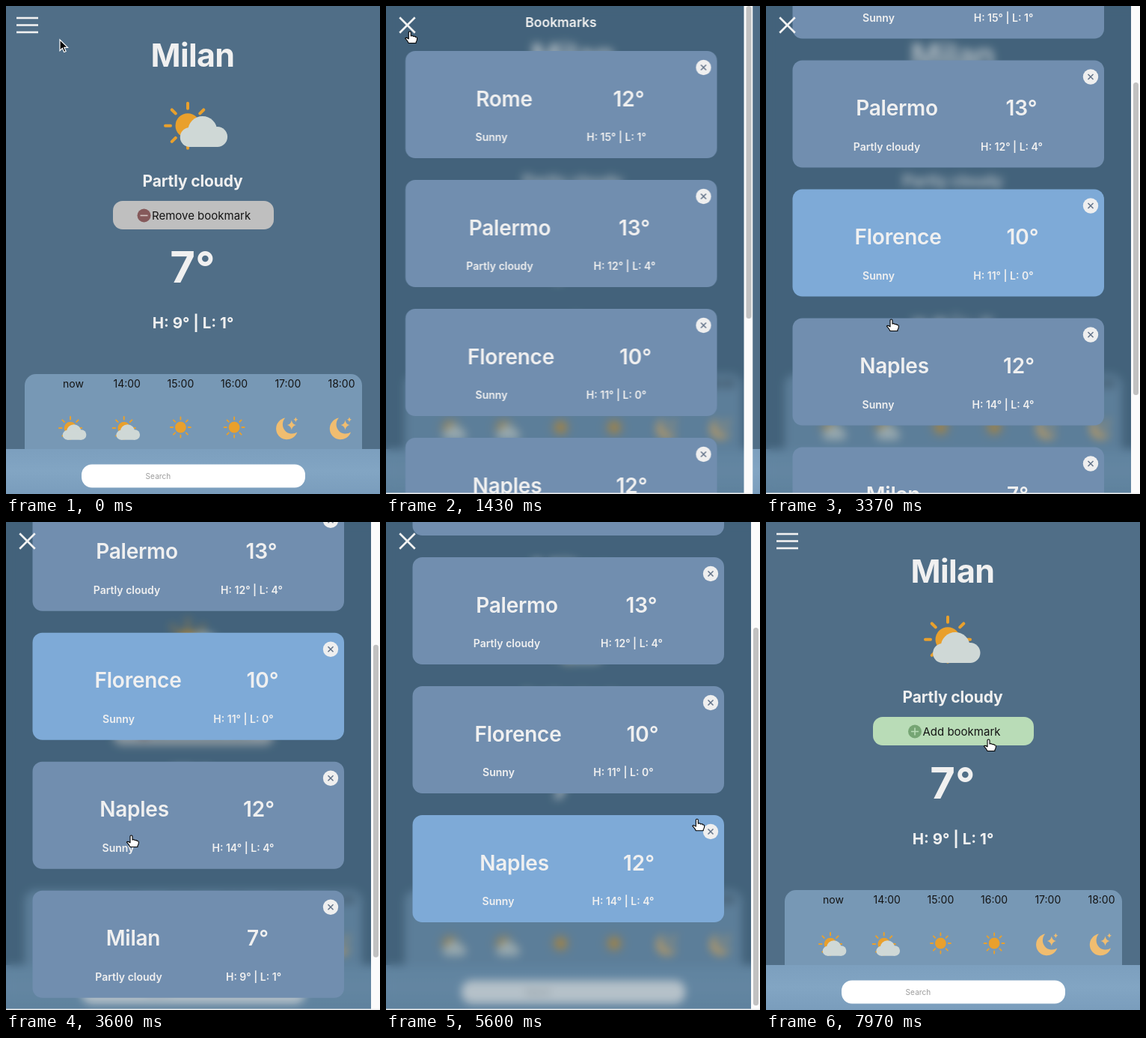
Animation, 500 px wide and 651 px high, one loop 8000 ms. Source, as an HTML page:

```html
<!DOCTYPE html>
<html lang="en">
<head>
<meta charset="utf-8">
<title>Weather bookmarks</title>
<style>
  html, body { margin: 0; width: 100%; height: 100%; overflow: hidden; background: #506e87; }
  body { position: relative; font-family: Inter, sans-serif; }
  svg { position: absolute; left: 0; top: 0; width: 500px; height: 651px; }
  text { text-anchor: middle; fill: #f0f0f0; }
  .bold { font-weight: 700; }
  .semi { font-weight: 600; }
  .dark { fill: #141414; }
  #panel {
    position: absolute; left: 0; top: 0; width: 500px; height: 651px; overflow: hidden;
    background: rgba(44, 79, 100, .35);
    -webkit-backdrop-filter: blur(6px); backdrop-filter: blur(6px);
  }
</style>
</head>
<body>
<svg id="main" viewBox="0 0 500 651">
  <defs>
    <g id="sun">
      <circle r="16.5" fill="#e9a02c"/>
      <path id="rays" stroke="#e9a02c" stroke-width="4" stroke-linecap="round"/>
    </g>
    <g id="cloud" fill="#cfd8d6">
      <circle cx="235.5" cy="175" r="13"/>
      <circle cx="252.5" cy="166.5" r="19.5"/>
      <circle cx="272.3" cy="174.5" r="13.5"/>
      <rect x="235" y="170" width="38" height="18"/>
    </g>
    <g id="partly">
      <use href="#sun" x="243" y="156.5"/>
      <use href="#cloud"/>
    </g>
    <g id="moon" fill="#f0bd70">
      <path d="M-3-13A14.5 14.5 0 1 0 13 6A12.5 12.5 0 0 1-3-13Z"/>
      <path d="M5.5-10q1 5.500 6 6.500q-5 1-6 6.500q-1-5.500-6-6.500q5-1 6-6.500ZM11-14q.5 2.800 3 3.300q-2.500.5-3 3.300q-.5-2.800-3-3.300q2.500-.5 3-3.300Z"/>
    </g>
    <linearGradient id="bar" x2="0" y2="1">
      <stop stop-color="#7c9fbe"/><stop offset=".5" stop-color="#82a5c3"/><stop offset="1" stop-color="#7a9dbc"/>
    </linearGradient>
  </defs>
  <rect width="500" height="651" fill="#506e87"/>
  <text class="bold" x="249.500" y="80.500" font-size="43" letter-spacing="-.6">Milan</text>
  <use id="bigSun" href="#sun"/>
  <use id="bigCloud" href="#cloud"/>
  <text class="bold" x="249.500" y="241" font-size="21" letter-spacing="-.15">Partly cloudy</text>
  <rect id="button" x="143" y="260" width="215" height="38" rx="13"/>
  <circle id="badge" cy="279.500" r="9"/>
  <path id="sign" fill="none" stroke-width="1.600"/>
  <text id="label" class="dark" y="285" font-size="15" style="text-anchor:start"></text>
  <text class="bold" x="249.500" y="369" font-size="58">7°</text>
  <text class="bold" x="250" y="430" font-size="20.500">H: 9° | L: 1°</text>
  <rect x="25" y="491" width="451" height="160" rx="15" fill="#7798b5"/>
  <g id="hours"></g>
  <rect y="591" width="500" height="60" fill="url(#bar)"/>
  <rect x="101" y="611.500" width="299" height="31" rx="14" fill="#fff"/>
  <text x="203.500" y="631" font-size="10" letter-spacing=".1" style="fill:#9c9c9c">Search</text>
</svg>

<div id="panel">
  <svg viewBox="0 0 500 651">
    <g id="list">
      <text class="semi" x="243.500" y="27.500" font-size="17.500">Bookmarks</text>
    </g>
    <rect x="488" width="12" height="651" fill="#fbfbfb"/>
    <rect id="thumb" x="491" width="7" rx="3.500" fill="#c1c1c1"/>
    <rect y="649.500" width="500" height="1.500" fill="#f0f0f0"/>
  </svg>
</div>

<svg viewBox="0 0 500 651">
  <g id="burger" stroke="#f2f2f2" stroke-width="2.600">
    <path d="M-14.500 0h29"/><path d="M-14.500 0h29"/><path d="M-14.500 0h29"/>
  </g>
  <path id="arrow" fill="#000" stroke="#fff" stroke-width="1.200"
        d="M0 0V14.500l3.400-3.200 2.300 5.200 2.400-1-2.300-5.100h4.700Z"/>
  <path id="hand" fill="#fff" stroke="#000" stroke-width="1.100" stroke-linejoin="round"
        d="M-2 9V1.500a1.500 1.500 0 0 1 3 0V6q3-1 3.200.8 2.800-.8 3 .8 2.200-.3 2.200 1.600 0 3-1.500 5v1.300H-2q-1-2.500-4.600-6.300 1.400-1.900 4.600.6Z"/>
</svg>

<script>
const LOOP = 8000, OPEN = 1020, CLOSE = 6395, REMOVED = 5100, SCROLL_END = 4080;
const CARD_TOP = 60, CARD_STEP = 172, CARD_H = 143;
const $ = id => document.getElementById(id);
const clamp = v => Math.min(1, Math.max(0, v));
const smooth = u => u * u * (3 - 2 * u);
const linear = u => u;

// CSS "ease", cubic-bezier(.25, .1, .25, 1)
function ease(x) {
  const bezier = (s, a, b) => 3 * s * (1 - s) ** 2 * a + 3 * s * s * (1 - s) * b + s ** 3;
  let lo = 0, hi = 1;
  for (let i = 0; i < 24; i++) {
    const mid = (lo + hi) / 2;
    if (bezier(mid, .25, .25) < x) lo = mid; else hi = mid;
  }
  return bezier(lo, .1, 1);
}

// keys: [time, value, value...]
function track(keys, t, curve) {
  const i = keys.findIndex(k => k[0] > t);
  if (i === 0) return keys[0].slice(1);
  if (i < 0) return keys[keys.length - 1].slice(1);
  const a = keys[i - 1], b = keys[i];
  const u = curve((t - a[0]) / (b[0] - a[0]));
  return a.slice(1).map((v, j) => v + (b[j + 1] - v) * u);
}

const mix = (a, b, u) => `rgb(${a.map((v, i) => Math.round(v + (b[i] - v) * u))})`;

const pointerKeys = [
  [250, 72, 45], [800, 33, 34], [1750, 32, 34], [2430, 163, 392], [2540, 168, 418],
  [4060, 168, 418], [4270, 431, 426], [4450, 434, 413], [5500, 434, 413],
  [6300, 30, 31], [6600, 30, 31], [6980, 437, 130], [7280, 343, 272], [7500, 335, 278], [7960, 298, 290]
];
const scrollKeys = [[2550, 0], [3000, 100], [3230, 100], [3600, 256], [4090, 356.5]];

const pointer = t => track(pointerKeys, t, smooth);
const scrollAt = t => t < REMOVED ? track(scrollKeys, t, linear)[0] : 185;

// city, temperature, sky, range, centre of the city, centre of the sky
const cities = [
  ["Rome", "12°", "Sunny", "H: 15° | L: 1°", 167.5, 150.5],
  ["Palermo", "13°", "Partly cloudy", "H: 12° | L: 4°", 175, 161.5],
  ["Florence", "10°", "Sunny", "H: 11° | L: 0°", 176.5, 150.5],
  ["Naples", "12°", "Sunny", "H: 14° | L: 4°", 171.5, 150],
  ["Milan", "7°", "Partly cloudy", "H: 9° | L: 1°", 170, 164]
];

const cards = cities.map(([city, temp, sky, range, cityX, skyX], i) => {
  const card = document.createElementNS("http://www.w3.org/2000/svg", "g");
  card.setAttribute("transform", `translate(0 ${CARD_TOP + i * CARD_STEP})`);
  card.innerHTML = `
    <rect x="35.5" width="416.500" height="${CARD_H}" rx="13"/>
    <g class="semi" font-size="28">
      <text x="${cityX}" y="73.500" letter-spacing="-.25">${city}</text>
      <text x="${cityX + 166.5}" y="73.500">${temp}</text>
    </g>
    <g class="semi" font-size="14">
      <text x="${skyX}" y="120">${sky}</text>
      <text x="${skyX + 167}" y="120">${range}</text>
    </g>
    <circle cx="434" cy="22" r="10.200" fill="#efefef"/>
    <path d="M430.500 18.500l7 7m0-7l-7 7" stroke="#64748a" stroke-width="1.500"/>`;
  $("list").append(card);
  return card;
});

$("rays").setAttribute("d", Array.from({ length: 8 }, (_, i) => {
  const c = Math.cos(i * Math.PI / 4), s = Math.sin(i * Math.PI / 4);
  return `M${c * 23} ${s * 23}L${c * 30} ${s * 30}`;
}).join(""));

const hourIcons = {
  partly: x => `<use href="#partly" transform="translate(${x - 4} 563) scale(.5) translate(-243 -156.500)"/>`,
  sun: x => `<use href="#sun" transform="translate(${x} 562) scale(.45)"/>`,
  moon: x => `<use href="#moon" transform="translate(${x - .5} 562.500)"/>`
};
$("hours").innerHTML = ["partly", "partly", "sun", "sun", "moon", "moon"].map((icon, i) => {
  const x = 90 + i * 71.7;
  return `<text class="dark" x="${x}" y="508.800" font-size="14">${i ? 13 + i + ":00" : "now"}</text>` + hourIcons[icon](x);
}).join("");

// What lies under the pointer; hit areas only refresh once scrolling stops.
function target(t) {
  const [x, y] = pointer(t);
  if (x > 10 && x < 46 && y > 10 && y < 42) return "burger";
  if (t > OPEN && t < CLOSE) {
    if (x < 35 || x > 452) return null;
    const offset = y - CARD_TOP + (t < SCROLL_END ? 0 : scrollAt(t));
    const i = Math.floor(offset / CARD_STEP);
    const count = t < REMOVED ? 5 : 4;
    return i >= 0 && i < count && offset - i * CARD_STEP < CARD_H ? i : null;
  }
  return x > 143 && x < 358 && y > 260 && y < 298 ? "button" : null;
}

// Share of the recent past spent over each target: a linear hover fade.
function hoverLevels(t) {
  const levels = {}, samples = 12;
  for (let i = 0; i < samples; i++) {
    const hit = target(t - 40 - i * 10);
    levels[hit] = (levels[hit] || 0) + 1 / samples;
  }
  return name => levels[name] || 0;
}

function drawMain(t, hover) {
  const sway = 14 * Math.abs(1 - ((t - 400 + 9000) % 3000) / 1500);
  $("bigCloud").setAttribute("x", sway);
  $("bigSun").setAttribute("transform", `translate(243 ${156.5 + sway * .31})`);

  const removed = t >= REMOVED;
  const iconX = removed ? 199 : 184.5;
  $("button").setAttribute("fill", mix([191, 191, 191], removed ? [185, 220, 183] : [224, 180, 180], hover("button")));
  $("badge").setAttribute("cx", iconX);
  $("badge").setAttribute("fill", removed ? "#76a574" : "#85595a");
  $("sign").setAttribute("d", `M${iconX - 5} 279.500h10` + (removed ? "m-5-5v10" : ""));
  $("sign").setAttribute("stroke", removed ? "#b9dcb7" : "#d5c5c3");
  $("label").setAttribute("x", iconX + 10.5);
  $("label").textContent = removed ? "Add bookmark" : "Remove bookmark";
}

function drawPanel(t, hover) {
  const shown = ease(clamp((t - OPEN) / 500)) - ease(clamp((t - CLOSE) / 500));
  $("panel").style.visibility = shown > .001 ? "visible" : "hidden";
  $("panel").style.transform = `translateX(${(shown - 1) * 500}px)`;

  const scroll = scrollAt(t), removed = t >= REMOVED;
  $("list").setAttribute("transform", `translate(0 ${-scroll})`);
  $("thumb").setAttribute("y", removed ? 141 : scroll * .639);
  $("thumb").setAttribute("height", removed ? 504 : 417);
  cards.forEach((card, i) => {
    card.firstElementChild.setAttribute("fill", mix([113, 142, 175], [126, 170, 215], hover(i)));
  });
  cards[4].style.display = removed ? "none" : "";
}

function drawBurger(t) {
  const p = ease(clamp((t - OPEN) / 390)) - ease(clamp((t - CLOSE) / 255));
  const shift = 9.5 * (1 - p) ** 2;
  const [top, middle, bottom] = $("burger").children;
  top.setAttribute("transform", `translate(28.500 ${25.5 - shift}) rotate(${-135 * p})`);
  bottom.setAttribute("transform", `translate(28.500 ${25.5 + shift}) rotate(${135 * p})`);
  middle.setAttribute("transform", "translate(28.500 25.500)");
  middle.setAttribute("opacity", 1 - p);
}

function drawPointer(t) {
  const [x, y] = pointer(t);
  const clickable = target(t) !== null;
  for (const [id, visible] of [["arrow", !clickable], ["hand", clickable]]) {
    $(id).setAttribute("transform", `translate(${x} ${y})`);
    $(id).style.display = visible ? "" : "none";
  }
}

const start = performance.now();
function frame() {
  const t = (performance.now() - start) % LOOP;
  const hover = hoverLevels(t);
  drawMain(t, hover);
  drawPanel(t, hover);
  drawBurger(t);
  drawPointer(t);
  requestAnimationFrame(frame);
}
frame();
</script>
</body>
</html>
```
